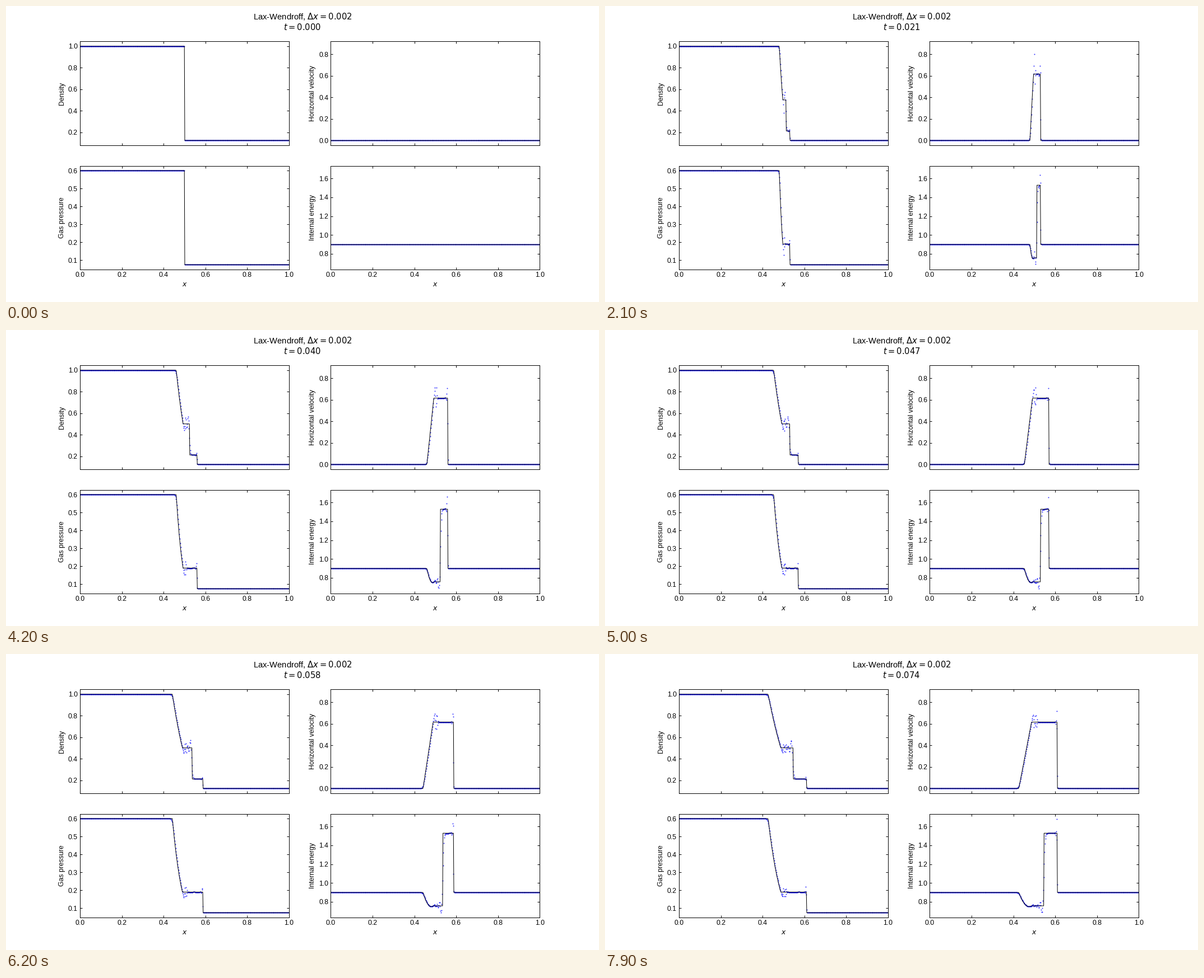
These frames come from a looping animation (1058x529 px, 8 s). A matplotlib script:

```python
import numpy as np
import matplotlib.pyplot as plt
from matplotlib.animation import FuncAnimation

plt.rcParams.update({
    "font.family": "Liberation Sans",
    "mathtext.fontset": "dejavusans",
    "xtick.direction": "in", "ytick.direction": "in",
    "xtick.top": True, "ytick.right": True,
})

GAMMA = 5 / 3
CFL = 0.9
DX = 0.002
STEPS = 80
RHO_L, P_L = 1.0, 0.6
RHO_R, P_R = 0.125, 0.075

x = (np.arange(500) + 0.5) * DX
left = x < 0.5


def primitive(U):
    rho, mom, energy = U
    u = mom / rho
    return rho, u, (GAMMA - 1) * (energy - 0.5 * mom * u)


def flux(U):
    rho, u, p = primitive(U)
    return np.array([U[1], U[1] * u + p, (U[2] + p) * u])


def lax_wendroff(U, ratio):
    """Richtmyer two-step update with fixed end states."""
    F = flux(U)
    half = 0.5 * (U[:, 1:] + U[:, :-1]) - 0.5 * ratio * (F[:, 1:] - F[:, :-1])
    G = flux(half)
    new = U.copy()
    new[:, 1:-1] -= ratio * (G[:, 1:] - G[:, :-1])
    return new


def simulate():
    rho = np.where(left, RHO_L, RHO_R)
    p = np.where(left, P_L, P_R)
    U = np.array([rho, 0 * x, p / (GAMMA - 1)])
    t, states = 0.0, []
    for _ in range(STEPS):
        rho, u, p = primitive(U)
        states.append((t, (rho, u, p)))
        dt = CFL * DX / np.max(np.abs(u) + np.sqrt(GAMMA * p / rho))
        U = lax_wendroff(U, dt / DX)
        t += dt
    return states


def star_state():
    """Pressure and velocity between the rarefaction and the shock."""
    c = np.sqrt(GAMMA * P_L / RHO_L)
    a = 2 / ((GAMMA + 1) * RHO_R)
    b = (GAMMA - 1) / (GAMMA + 1) * P_R
    lo, hi = P_R, P_L
    for _ in range(60):
        p = 0.5 * (lo + hi)
        u_left = 2 * c / (GAMMA - 1) * (1 - (p / P_L) ** ((GAMMA - 1) / (2 * GAMMA)))
        u_right = (p - P_R) * np.sqrt(a / (p + b))
        if u_right < u_left:
            lo = p
        else:
            hi = p
    return p, u_right


P_S, U_S = star_state()


def exact(t):
    if t == 0:
        return np.where(left, RHO_L, RHO_R), 0 * x, np.where(left, P_L, P_R)
    xi = (x - 0.5) / t
    c_l = np.sqrt(GAMMA * P_L / RHO_L)
    # rarefaction fan, clipped to the states on both sides
    u = np.clip(2 / (GAMMA + 1) * (c_l + xi), 0, U_S)
    c = 1 - (GAMMA - 1) / 2 * u / c_l
    rho = RHO_L * c ** (2 / (GAMMA - 1))
    p = P_L * c ** (2 * GAMMA / (GAMMA - 1))
    # shocked gas, then the undisturbed right side
    g, r = (GAMMA - 1) / (GAMMA + 1), P_S / P_R
    rho_s = RHO_R * (r + g) / (g * r + 1)
    speed = U_S * rho_s / (rho_s - RHO_R)
    rho = np.where(xi > U_S, rho_s, rho)
    ahead = xi > speed
    return (np.where(ahead, RHO_R, rho), np.where(ahead, 0, u),
            np.where(ahead, P_R, p))


def panels(rho, u, p):
    # the energy panel includes the kinetic part
    return rho, u, p, p / ((GAMMA - 1) * rho) + 0.5 * u ** 2


states = simulate()

fig, axes = plt.subplots(2, 2, sharex=True, figsize=(12, 6), dpi=1058 / 12)
names = ["Density", "Horizontal velocity", "Gas pressure", "Internal energy"]
ranges = [(RHO_R, RHO_L), (0, 0.876), (P_R, P_L), (0.685, 1.683)]

dots, lines = [], []
for ax, name, (lo, hi) in zip(axes.flat, names, ranges):
    dots += ax.plot(x, 0 * x, "b.", ms=1)
    lines += ax.plot(x, 0 * x, "k-", lw=0.8)
    pad = 0.05 * (hi - lo)
    ax.set(xlim=(0, 1), ylim=(lo - pad, hi + pad), ylabel=name)
for ax in axes[1]:
    ax.set_xlabel("$x$")
title = fig.suptitle("", y=0.982)


def update(i):
    t, state = states[i]
    title.set_text("Lax-Wendroff, $\\Delta x = 0.002$\n$t = %.3f$" % t)
    for dot, y in zip(dots, panels(*state)):
        dot.set_ydata(y)
    for line, y in zip(lines, panels(*exact(t))):
        line.set_ydata(y)
    return [title, *dots, *lines]


anim = FuncAnimation(fig, update, frames=STEPS, interval=100, repeat=True,
                     repeat_delay=0, blit=False)
plt.show()
```
